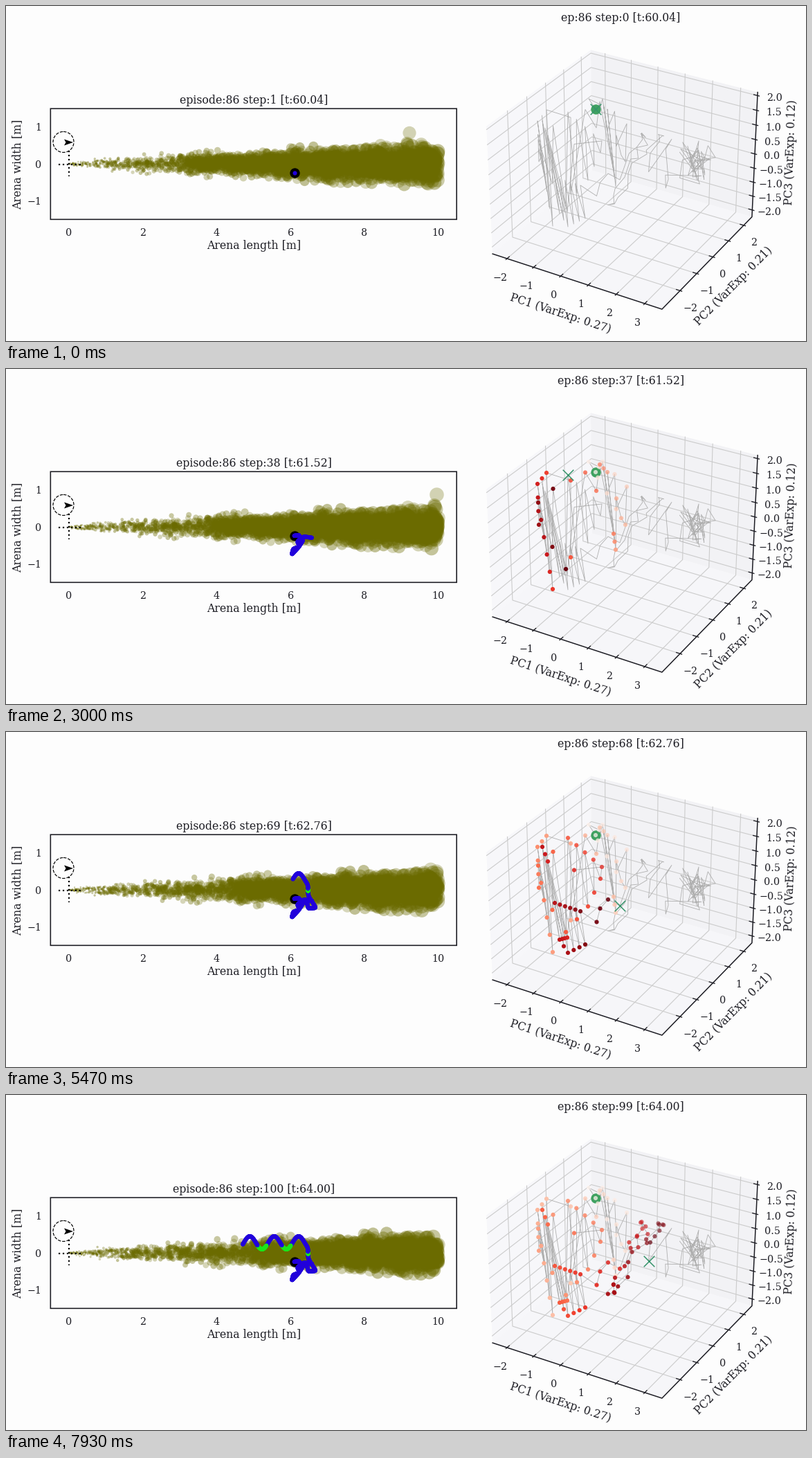
A matplotlib script that plays this animation: 1156x484 px, repeating every 8 s.

```python
import matplotlib.pyplot as plt
import numpy as np
from matplotlib.animation import FuncAnimation
from matplotlib.patches import Circle, Polygon, Rectangle

W, H, DPI = 1156, 484, 100
STEPS, STEP_MS = 100, 80
PT = 72 / DPI
INK = "#1b1b22"
LABEL, TICK = 15.7, 14.2

plt.rcParams["font.family"] = "DejaVu Serif"
rng = np.random.default_rng(86)

fig = plt.figure(figsize=(W / DPI, H / DPI), dpi=DPI, facecolor="#fdfdfd")
ax = fig.add_axes([0, 0, 1, 1])
ax.set_xlim(0, W)
ax.set_ylim(H, 0)
ax.axis("off")


def line(pts, color=INK, width=1.4, **kw):
    x, y = np.transpose(pts)
    return ax.plot(x, y, color=color, lw=width * PT, **kw)[0]


def label(x, y, s, size=LABEL, ha="center", va="baseline", **kw):
    return ax.text(x, y, s, fontsize=size * PT, color=INK, ha=ha, va=va, **kw)


def area(radius):
    """Marker area in square points for a radius in pixels."""
    return (2 * np.asarray(radius) * PT) ** 2


def num(v, digits=0):
    return f"{v:.{digits}f}".replace("-", "\u2212")


def follow(keys, when):
    """Positions at given steps along (step, x, y) key points."""
    step, x, y = np.transpose(keys)
    return np.column_stack([np.interp(when, step, x), np.interp(when, step, y)])


# ---- Arena -------------------------------------------------------------
X0, Y0, M = 91, 228.3, 53.35
DRIFT = 0.02 * M
REACH = 10 * M


def draw_arena():
    ax.add_patch(Rectangle((X0 - M / 2, Y0 - 1.5 * M), 11 * M, 3 * M, snap=False,
                           fill=False, ec=INK, lw=1.6 * PT, zorder=6))
    for v in range(0, 11, 2):
        label(X0 + v * M, 332, num(v), TICK)
    for v in (-1, 0, 1):
        label(51, Y0 - v * M + 5.2, num(v), TICK, ha="right")
    label(358, 351, "Arena length [m]")
    label(16.5, 229, "Arena width [m]", va="center", rotation=90)

    dots = dict(color="black", width=2.2, ls=(0, (1, 1.7)), zorder=4)
    line([(X0, 209), (X0, 246)], **dots)
    line([(76, 229), (108, 229)], **dots)
    ax.add_patch(Circle((83, 196.5), 15, fill=False, ec="black",
                        lw=1.2 * PT, ls=(0, (3.7, 1.6)), zorder=4))
    ax.add_patch(Polygon([(84, 192.5), (97, 197), (84, 201.5), (86.5, 197)],
                         fc="black", lw=0, zorder=4))


# Puffs drift downwind, spreading with the root of the distance;
# the upwind part is thinner, and one puff strays far off the axis.
born = np.concatenate([rng.uniform(-DRIFT * STEPS, 170, 800),
                       rng.uniform(170, REACH, 2300), [492]])
side = np.append(np.clip(rng.normal(0, 1.05, born.size - 1), -3, 3), -4.5)
tint = np.tile([0.42, 0.42, 0.0, 0.32], (born.size, 1))
tint[:, 3] = rng.uniform(0.26, 0.42, born.size)
puffs = ax.scatter([], [], linewidths=0, zorder=2)


def draw_plume(k):
    x = born + DRIFT * k
    live = (x > 0) & (x < REACH)
    x = x[live]
    puffs.set_offsets(np.column_stack([X0 + x,
                                       Y0 + side[live] * 0.45 * np.sqrt(x)]))
    puffs.set_sizes(area(1 + 9.3 * x / REACH))
    puffs.set_facecolor(tint[live])


# The agent circles below the plume, then casts upwind in even waves.
SUB, CAST = 6, 59
when = np.arange((STEPS - 1) * SUB + 1) / SUB
wave = np.cos(2 * np.pi * (when - 64.5) / 15)
search = follow([(0, 416.5, 241), (6, 423, 240), (11, 429, 248), (15, 423, 257),
                 (19, 415, 260), (22, 413, 268), (28, 424, 256), (31, 421, 249),
                 (34, 430, 242), (37, 443, 244), (41, 434, 243), (46, 437, 255),
                 (50, 448, 254), (53, 437, 237), (CAST, 436, 220)], when)
cast = np.column_stack([424 - 2.35 * (when - 64), 213.5 - 9.5 * wave])
flight = np.where(when[:, None] < CAST, search, cast)


def smooth(v, n=9):
    return np.convolve(np.pad(v, n // 2, mode="edge"), np.ones(n) / n, "valid")


flight = np.apply_along_axis(smooth, 0, flight)
in_odor = (((when > 68) & (wave < -0.4))
           | ((when > 54) & (np.abs(flight[:, 1] - Y0) < 2)))
flight_rgb = np.where(in_odor[:, None], (0.1, 0.9, 0.1), (0.13, 0.0, 0.86))

ax.scatter(*flight[0], s=area(7.2), c="black", linewidths=0, zorder=4)
trail = ax.scatter([], [], s=area(3.1), linewidths=0, zorder=5)

# ---- Principal component space -----------------------------------------
A, C = 0.595, 0.4464
PC1, PC2, PC3 = (-2.548, 3.596), (-3.046, 2.557), (-2.25, 2.11)


def project(p):
    """Perspective view at elevation 30, azimuth -60, in pixels."""
    x, y, z = np.transpose(p)
    depth = 10 - (0.433 * x - 0.75 * y + 0.5 * z)
    right = 0.866 * x + 0.5 * y
    up = -0.25 * x + 0.433 * y + 0.866 * z
    return np.column_stack([894 + 2356 * right / depth,
                            241.8 - 2356 * up / depth])


def world(v, lim, half):
    return half * (2 * (v - lim[0]) / (lim[1] - lim[0]) - 1)


def draw_box():
    panes = (([(-A, -A, -C), (-A, A, -C), (-A, A, C), (-A, -A, C)], 0.97),
             ([(-A, A, -C), (A, A, -C), (A, A, C), (-A, A, C)], 0.95),
             ([(-A, -A, -C), (A, -A, -C), (A, A, -C), (-A, A, -C)], 0.965))
    for corners, shade in panes:
        ax.add_patch(Polygon(project(corners), fc=(shade, shade, shade + 0.01),
                             lw=0, zorder=1))

    def grid(pts):
        line(project(pts), "#cbcbcb", 1.1, zorder=1.5)

    def tick(p, q, dx, dy, text):
        """Tick mark from p to q, with its text set off from the mark."""
        ends = project([p, q])
        line(ends, width=1.3, zorder=3)
        x, y = ends.mean(axis=0)
        label(x + dx, y + dy, text, TICK)

    inn, out = A - 0.025, A + 0.012
    for v in range(-2, 4):
        x = world(v, PC1, A)
        grid([(x, -A, -C), (x, A, -C), (x, A, C)])
        tick((x, -inn, -C), (x, -out, -C), -11, 32.5, num(v))
    for v in range(-2, 3):
        y = world(v, PC2, A)
        grid([(A, y, -C), (-A, y, -C), (-A, y, C)])
        tick((inn, y, -C), (out, y, -C), 16, 30, num(v))
    for v in np.arange(-2, 2.1, 0.5):
        z = world(v, PC3, C)
        grid([(-A, -A, z), (-A, A, z), (A, A, z)])
        tick((inn, A, z), (out, A, z), 26, 8, num(v, 1))

    line(project([(-A, -A, -C), (A, -A, -C), (A, A, -C), (A, A, C)]),
         width=1.5, zorder=3)
    label(801, 444, "PC1 (VarExp: 0.27)", va="center", rotation=-18)
    label(1051, 405, "PC2 (VarExp: 0.21)", va="center", rotation=45.4)
    label(1134, 211, "PC3 (VarExp: 0.12)", va="center", rotation=88)


# The state flips every step between two slow tracks, then settles on one
# drifting loop and ends in a dense knot.
EVEN = [(0, 852, 149), (4, 862, 134), (8, 897, 170), (12, 881, 261),
        (16, 878, 238), (18, 853, 176), (20, 816, 272), (22, 781, 150),
        (26, 768, 166), (32, 770, 225), (36, 809, 289), (40, 841, 252),
        (44, 859, 212), (48, 783, 187), (52, 775, 166), (54, 793, 247),
        (64, 830, 259), (68, 887, 251)]
ODD = [(1, 842, 134), (9, 895, 225), (13, 869, 149), (17, 858, 138),
       (21, 816, 161), (23, 790, 318), (33, 769, 193), (37, 812, 153),
       (45, 861, 195), (47, 811, 297), (53, 800, 300), (57, 812, 319),
       (63, 837, 307), (67, 870, 242)]
LOOP = 69

step = np.arange(STEPS)
turn = 2 * np.pi * (step - 73) / 21
loop = np.column_stack([893 + 1.1 * (step - 73) + 32 * np.cos(turn),
                        235 - 50 * np.cos(turn)])
loop += rng.normal(0, 4, loop.shape)
flips = np.where(step[:, None] % 2, follow(ODD, step), follow(EVEN, step))
state = np.where(step[:, None] < LOOP, flips, loop)
leave = rng.uniform((938, 188), (962, 266), (5, 2))
knot = rng.normal((998, 221), (12, 15), (44, 2))

# Far points, up and to the right, are drawn fainter.
far = (state[:, 0] - 780) / 170 * (300 - state[:, 1]) / 120
fade = 1 - 0.5 * np.clip(far, 0, 1)

line(np.vstack([state, leave, knot]), "#b0b0b0", 0.85, zorder=3.5)
ax.scatter(*state[0], s=area(7.2), c="#3fa160", linewidths=0, zorder=4)
dots = ax.scatter([], [], s=area(3.1), linewidths=0, zorder=5)
cross = ax.scatter([], [], s=area(7.8), marker="x", c="#35936a",
                   linewidths=1.5 * PT, zorder=6)
reds = plt.get_cmap("Reds")

draw_arena()
draw_box()
left_title = label(358, 141, "")
right_title = label(888.5, 21.5, "")


def update(k):
    clock = f"[t:{60.04 + 0.04 * k:.2f}]"
    left_title.set_text(f"episode:86 step:{k + 1} {clock}")
    right_title.set_text(f"ep:86 step:{k} {clock}")

    draw_plume(k)
    n = k * SUB + 1
    trail.set_offsets(flight[:n])
    trail.set_facecolor(flight_rgb[:n])

    shades = reds(np.linspace(0, 1, k))
    shades[:, 3] = fade[:k]
    dots.set_offsets(state[:k])
    dots.set_facecolor(shades)
    cross.set_offsets(state[k:k + 1])
    return puffs, trail, dots, cross, left_title, right_title


anim = FuncAnimation(fig, update, frames=STEPS, interval=STEP_MS, repeat=True)
plt.show()
```
